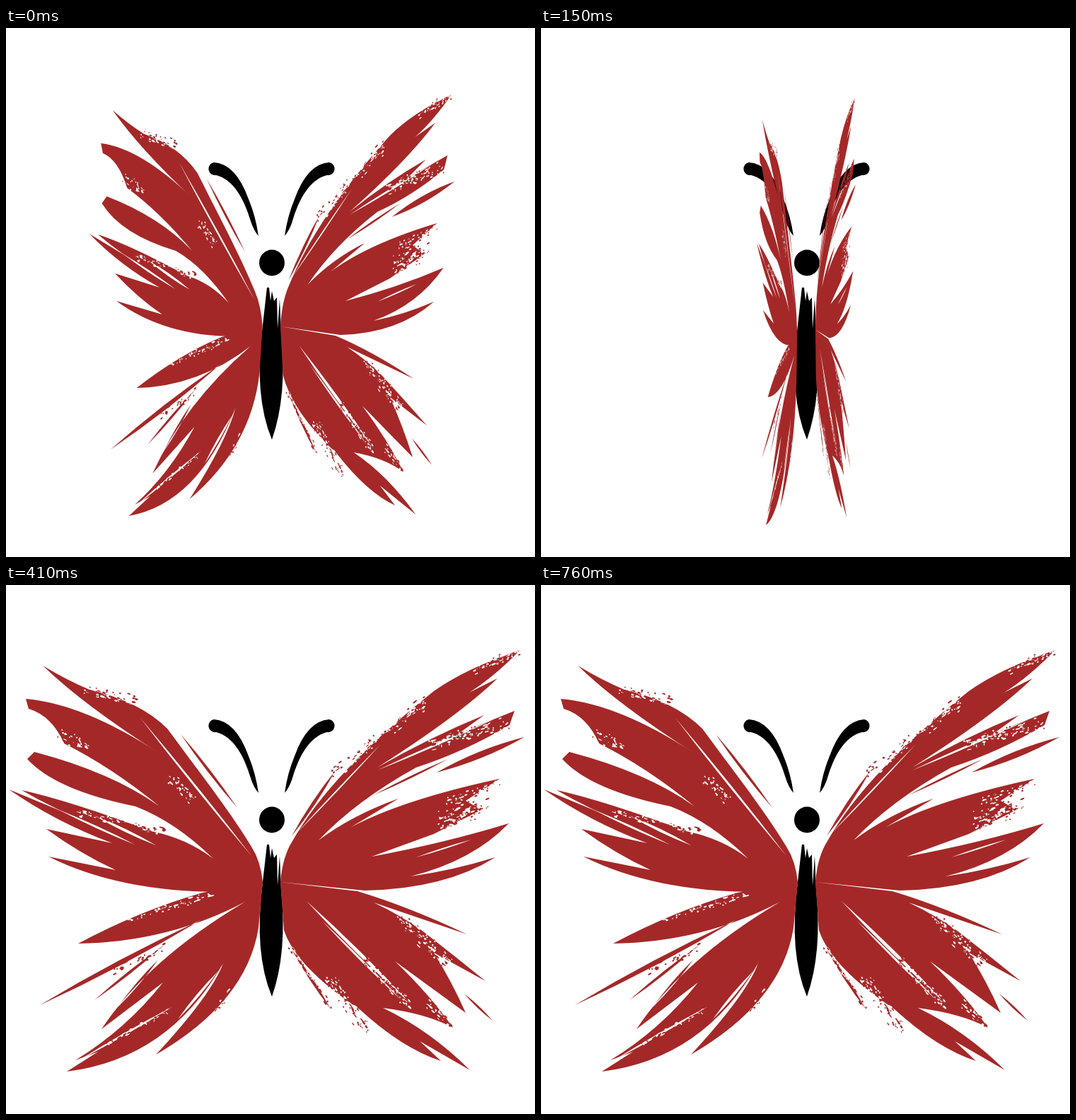
An HTML page with a canvas for the animation above (810 ms loop, 748 px wide and 748 px high).

```html
<!DOCTYPE html>
<html lang="en">
<head>
<meta charset="utf-8">
<title>Butterfly</title>
<style>
  html, body { margin: 0; height: 100%; overflow: hidden; background: #fff; }
  canvas { display: block; width: 748px; height: 748px; }
</style>
</head>
<body>
<canvas id="stage" width="748" height="748"></canvas>
<script>
const ctx = document.getElementById('stage').getContext('2d');

let seed = 7;
const random = () => (seed = (seed * 16807) % 2147483647) / 2147483647;

class Wing {
  constructor(hinge) {
    this.hinge = hinge;
    this.ink = new Path2D();
    this.cuts = new Path2D();
    this.dust = new Path2D();
  }
  feathers(outline) {
    this.ink.addPath(new Path2D(outline));
    return this;
  }
  // Thin tapered sliver between two points
  sliver(path, x1, y1, x2, y2, w) {
    const len = Math.hypot(x2 - x1, y2 - y1);
    const nx = (y1 - y2) / len * w, ny = (x2 - x1) / len * w;
    const cx = (x1 + x2) / 2, cy = (y1 + y2) / 2;
    path.moveTo(x1, y1);
    path.quadraticCurveTo(cx - nx, cy - ny, x2, y2);
    path.quadraticCurveTo(cx + nx, cy + ny, x1, y1);
  }
  // Dry-brush band: flecks removed from and added to the paint
  scuff(x1, y1, x2, y2, band) {
    const len = Math.hypot(x2 - x1, y2 - y1);
    const ux = (x2 - x1) / len, uy = (y2 - y1) / len;
    const angle = Math.atan2(uy, ux);
    const count = len * band / 9;
    for (let i = 0; i < count; i++) {
      const path = i % 5 < 3 ? this.cuts : this.dust;
      const along = random() * len, off = (random() + random() - 1) * band;
      const x = x1 + ux * along - uy * off, y = y1 + uy * along + ux * off;
      const long = 0.8 + random() * random() * 4;
      path.moveTo(x, y);
      path.ellipse(x, y, long, 0.6 + random() * 0.8, angle, 0, 7);
    }
  }
  add(list) { list.forEach(s => this.sliver(this.ink, ...s)); return this; }
  cut(list) { list.forEach(s => this.sliver(this.cuts, ...s)); return this; }
  wear(list) { list.forEach(s => this.scuff(...s)); return this; }

  draw([fold, drop]) {
    ctx.setTransform(fold, 0, 0, 1, this.hinge * (1 - fold), drop);
    ctx.fillStyle = '#a52828';
    ctx.globalCompositeOperation = 'source-over';
    ctx.fill(this.ink);
    ctx.globalCompositeOperation = 'destination-out';
    ctx.fill(this.cuts);
    ctx.globalCompositeOperation = 'source-over';
    ctx.fill(this.dust);
  }
}

const left = new Wing(362)
  .feathers(`M363 420Q360 390 347 370C320 325 285 280 228 203Q190 165 118 148Q85 134 52 114
    Q110 170 217 238Q110 168 28 161L32 175Q65 185 82 224Q150 258 217 313Q150 265 40 236L30 246
    Q70 290 183 313Q240 335 293 387Q255 358 205 348Q90 305 22 290Q70 318 120 337L4 289
    Q70 335 150 365L57 345Q105 380 155 403L60 384Q160 434 305 434Z`)
  .feathers(`M363 420L278 435Q190 460 102 507Q230 505 338 448Q200 530 135 628L222 562
    Q170 628 98 672L130 660L86 688Q230 670 307 535Q290 580 212 664Q340 590 357 485Z`)
  .add([[247, 211, 327, 315, 4], [275, 474, 48, 594, 7], [125, 587, 225, 508, 4], [158, 597, 215, 530, 4]])
  .cut([[190, 188, 347, 383, 3], [125, 326, 212, 368, 4], [75, 318, 182, 367, 3],
    [103, 672, 236, 596, 3], [300, 546, 243, 614, 4]])
  .wear([[112, 147, 187, 164, 9], [74, 210, 115, 230, 10], [100, 321, 225, 350, 7],
    [230, 273, 265, 304, 10], [165, 475, 292, 437, 5], [150, 549, 226, 512, 7],
    [140, 652, 232, 600, 4], [297, 603, 322, 570, 5]]);

const right = new Wing(388)
  .feathers(`M388 420Q391 384 405 362Q460 265 605 150Q650 118 727 92Q690 130 655 152L695 132
    Q640 185 525 258Q600 215 676 184L640 210L719 178L712 198Q650 235 580 258Q495 305 442 361
    Q490 325 555 302L455 362Q530 310 698 274L650 305L672 318L605 352L517 384Q620 365 711 337
    Q660 390 572 412Q630 404 692 385Q620 430 507 432Z`)
  .feathers(`M388 420L497 433Q570 455 652 494L520 449Q560 468 590 490Q635 525 678 560L605 520
    Q630 560 650 605L550 532Q600 580 632 626Q595 606 533 598Q600 630 656 686L585 645L615 673
    Q560 655 500 600Q410 540 393 488Z`)
  .add([[404, 355, 466, 262, 5], [609, 265, 733, 215, 9], [520, 297, 625, 246, 3],
    [403, 514, 460, 601, 4], [648, 578, 688, 616, 3]])
  .cut([[425, 447, 572, 592, 5], [447, 475, 560, 588, 3], [410, 352, 530, 225, 2],
    [525, 262, 690, 190, 3], [580, 385, 658, 360, 2]])
  .wear([[460, 268, 600, 160, 10], [660, 122, 726, 93, 7], [600, 224, 710, 196, 11],
    [610, 338, 685, 310, 18], [620, 308, 698, 280, 8], [400, 510, 460, 598, 5],
    [455, 552, 512, 632, 14], [505, 530, 575, 598, 8], [555, 468, 625, 535, 12],
    [595, 590, 636, 628, 8]]);

const antenna = new Path2D(
  'M294 190Q325 192 343 242Q353 266 357 294Q350 286 346 273C337 243 322 214 297 208A9 9 0 1 1 294 190Z');
const body = new Path2D(`M369 367L372 367L374 386L376 372L379 386L383 381L384 425L387 383L389 430
  Q398 520 376 582Q350 520 363 420Z`);
body.moveTo(394, 332);
body.ellipse(376, 332, 18, 18.5, 0, 0, 7);

// Each pose: horizontal fold and drop per side
const OPEN = { left: [1, 0], right: [1, 0] };
const HALF = { left: [0.682, 2], right: [0.714, 2] };
const SHUT = { left: [0.159, 15], right: [0.165, 6.5] };
const FLAP = [HALF, SHUT, HALF, OPEN];
const HOLDS = [...Array(7).fill(30), ...Array(4).fill(50), 200, ...Array(4).fill(50)];
const LOOP = HOLDS.reduce((a, b) => a + b);

function poseAt(time) {
  let step = 0;
  for (; time >= HOLDS[step]; step++) time -= HOLDS[step];
  return FLAP[step % 4];
}

function draw(now) {
  const pose = poseAt(now % LOOP);
  ctx.setTransform(1, 0, 0, 1, 0, 0);
  ctx.clearRect(0, 0, 748, 748);
  left.draw(pose.left);
  right.draw(pose.right);

  // Body and antennae sit behind the wings
  ctx.globalCompositeOperation = 'destination-over';
  ctx.fillStyle = '#000';
  ctx.setTransform(1, 0, 0, 1, 0, 0);
  ctx.fill(body);
  ctx.fill(antenna);
  ctx.setTransform(-1, 0, 0, 1, 751, 0);
  ctx.fill(antenna);
  requestAnimationFrame(draw);
}
draw(0);
</script>
</body>
</html>
```
